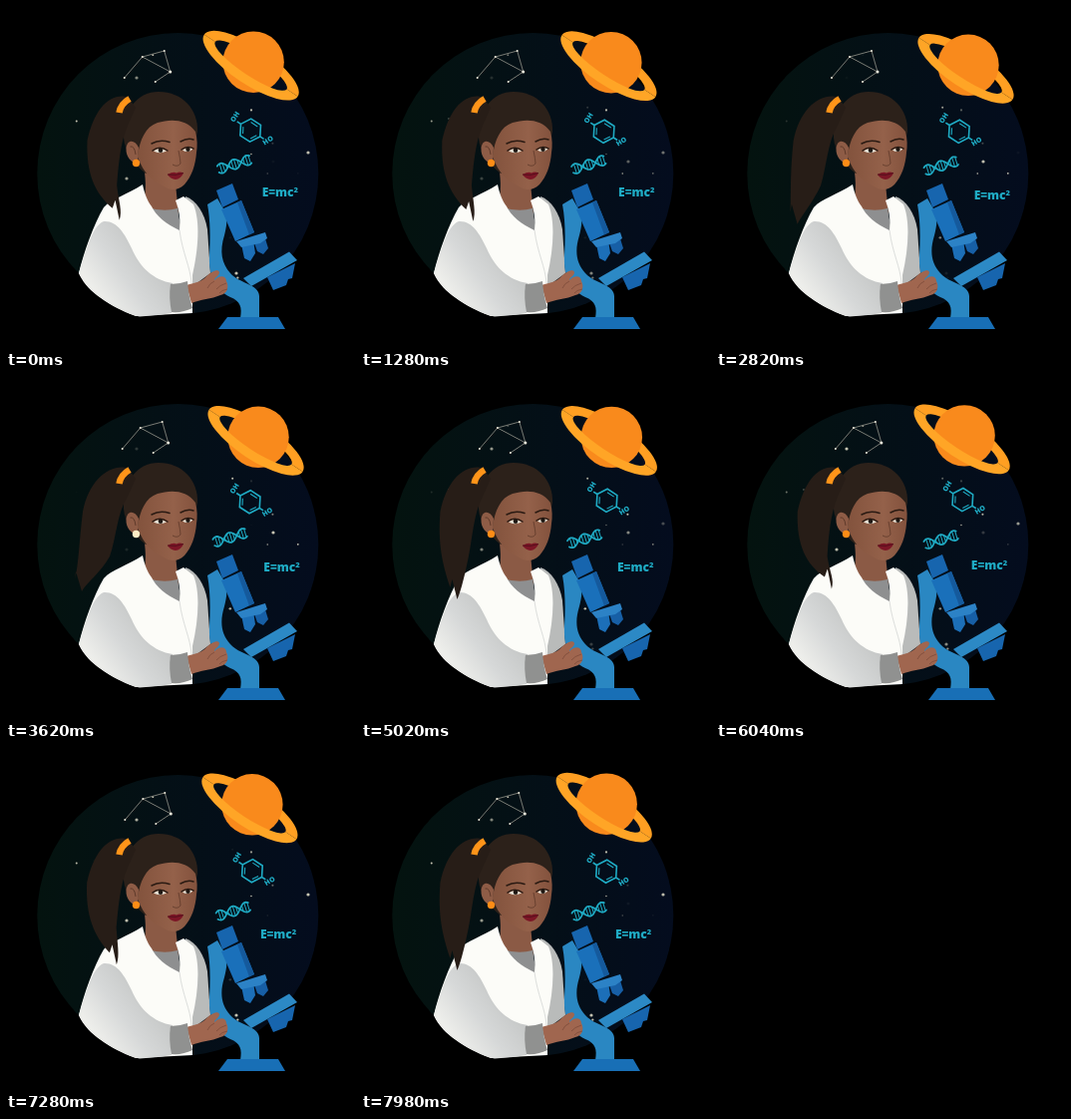
Animation of 350 by 344 pixels, one loop 8000 ms. Source, as an HTML page:

```html
<!DOCTYPE html>
<html lang="en">
<head>
<meta charset="utf-8">
<title>Scientist</title>
<style>
html, body { margin: 0; width: 100%; height: 100%; overflow: hidden; background: #000; }
svg { display: block; width: 100vw; height: 100vh; }
text { font-family: "Open Sans", "Noto Sans", sans-serif; font-weight: 800; }
</style>
</head>
<body>
<svg viewBox="0 0 350 344">
  <defs>
    <linearGradient id="night">
      <stop offset="0" stop-color="#04130f"/><stop offset="1" stop-color="#040c1e"/>
    </linearGradient>
    <linearGradient id="sleeveFill" x1=".9" y1=".3" x2=".1" y2=".9">
      <stop offset="0" stop-color="#bfc1c0"/><stop offset=".5" stop-color="#d6d8d8"/><stop offset="1" stop-color="#f8f8f3"/>
    </linearGradient>
    <linearGradient id="skin">
      <stop offset="0" stop-color="#83533d"/><stop offset=".6" stop-color="#94614a"/><stop offset="1" stop-color="#83523d"/>
    </linearGradient>
    <clipPath id="back"><rect x="-70" y="-40" width="140" height="40"/></clipPath>
    <clipPath id="front"><rect x="-70" y="0" width="140" height="40"/></clipPath>
  </defs>

  <rect width="350" height="344" fill="#000"/>
  <circle cx="172.300" cy="168" r="141" fill="url(#night)"/>
  <g id="stars" fill="#c8c6b4"></g>

  <g id="sky" fill="none" stroke="#96968c" stroke-width=".8">
    <path d="M0 0L18 -21L40 -27L46 -6L31 4M18 -21L46 -6"/>
    <g fill="#eeeadb" stroke="none">
      <circle r="1"/><circle cx="18" cy="-21" r="1"/><circle cx="40" cy="-27" r="1"/>
      <circle cx="46" cy="-6" r="1.500"/><circle cx="31" cy="4" r="1"/>
    </g>
  </g>

  <g id="planet">
    <g transform="translate(-2.500 3.500) rotate(33.500)"><path class="ring" clip-path="url(#back)" fill="#ff9f22"/></g>
    <circle r="30.700" fill="#f98a1c"/>
    <g transform="translate(-2.500 3.500) rotate(33.500)"><path class="ring" clip-path="url(#front)" fill="#ffa526"/></g>
  </g>

  <g id="molecule" fill="none" stroke="#1fabc4" stroke-width="1.600">
    <g transform="rotate(33)">
      <path d="M-11.500 0L-5.800 -10H5.800L11.500 0L5.800 10H-5.800ZM-11.500 0H-16M11.500 0H16"/>
      <path d="M-4 -7H4M8 1L4.500 7M-8 1L-4.500 7" stroke-width="1.100"/>
    </g>
    <g fill="#1fabc4" stroke="none" font-size="7" text-anchor="middle">
      <text transform="translate(-15.500 -13.500) rotate(-58)" y="2.500">OH</text>
      <text transform="translate(17.500 10) rotate(-32)" y="2.500">HO</text>
    </g>
  </g>

  <g id="dna" fill="none" stroke="#1fabc4" stroke-width="1.700" stroke-linecap="round">
    <g transform="rotate(-17)">
      <path id="strandA"/><path id="strandB"/><path id="rungs" stroke-width="1"/>
    </g>
  </g>

  <g id="formula" fill="#1fabc4">
    <text font-size="12">E=mc<tspan font-size="7.500" dy="-4">2</tspan></text>
  </g>

  <!-- far sleeve, neck, coat -->
  <path d="M180 191C191 195 199 207 202 224L205 268L186 282Z" fill="#b9bbba"/>
  <path d="M138 160C141 178 140 188 138 198L150 210L173 209L170 178Z" fill="#8b5a45"/>
  <path d="M142 202Q158 207 172 203L176 226L164 226Z" fill="#8e8f90"/>
  <path d="M137 179C122 189 106 193 98 202C88 219 78 247 73 268C80 284 96 297 130 311L187 308V270C193 244 195 216 188 199L178 191L170 195C174 206 175 214 174 225C161 219 150 210 146 201C141 194 139 188 137 179Z" fill="#fcfcf8"/>
  <path d="M174 225C177 248 185 262 186 278" fill="none" stroke="#dcdedc"/>
  <path d="M98 216C111 215 119 228 126 243C134 262 148 275 167 278L166 308Q150 311 134 311.500C118 308 88 294 73 268C79 250 86 220 98 216Z" fill="url(#sleeveFill)"/>

  <!-- head -->
  <path d="M118 132C117 104 132 86 153 86C177 86 193 104 192 126L187 150L140 168C128 158 119 146 118 132Z" fill="#2c211a"/>
  <path d="M132 151C134 134 140 121 152 117C165 113 181 113 190 126C192 133 192 141 191 147C190 160 186 171 179 179C172 186 164 185 157 180C147 176 138 168 132 151Z" fill="url(#skin)"/>
  <path d="M133 142C129 133 121 134 120.500 143C120 151 126 158 132 158Z" fill="#8e5c46"/>
  <path d="M130 149Q129 140 124.500 141" fill="none" stroke="#5e3a2a"/>
  <g fill="none" stroke="#2a1a12" stroke-linecap="round">
    <path d="M146 138Q154 133.500 164 136.500M175 136Q182 132 188 134" stroke-width="1.500"/>
    <path d="M147 145Q154 139.500 162 145M176 144Q182 139.500 188 143" stroke-width="1.500"/>
  </g>
  <path d="M148 145.500Q154 141 161 145.500Q154 149 148 145.500ZM177 144.500Q182 141 187.500 143.500Q182 148 177 144.500Z" fill="#e8e4d8"/>
  <g fill="#1f1712"><circle cx="155" cy="144.800" r="2.300"/><circle cx="182.500" cy="143.800" r="2.200"/></g>
  <path d="M173 145Q175 154 175 158Q172 162 167 159" fill="none" stroke="#68402f"/>
  <path d="M162 169Q168 165.500 171 167.500Q174 165.500 178 167.500Q175 174 170 174Q165 173.500 162 169Z" fill="#7c1626"/>
  <path d="M162 169Q170 170.500 178 167.500" fill="none" stroke="#4b0d18" stroke-width=".8"/>
  <circle id="earring" cx="130.500" cy="157.500" r="3.700"/>

  <path id="tail" fill="#271d17"/>
  <path d="M113.500 107Q115 98 124 93" fill="none" stroke="#ff9419" stroke-width="6.500"/>

  <!-- microscope -->
  <path d="M202 199L212 193L219 205C223 213 221 222 219 230C214 246 216 258 225 268C233 278 254 279 254 291V313H235C237 302 235 296 225 292C209 284 203 270 204 250C205 233 205 215 202 199Z" fill="#2a87c2"/>
  <path d="M211 185L227 178L233 194L217 202Z" fill="#1765ae"/>
  <path d="M216 204L236 195L249 227L230 236Z" fill="#1a70ba"/>
  <path d="M232 197L236 195L249 227L244 229.500Z" fill="#155a9d"/>
  <path d="M236 239L248 235L250 248L245 256L239 253Z" fill="#1c6fb8"/>
  <path d="M248 235L259 230L263 243L258 249L252 246Z" fill="#175fa6"/>
  <path d="M231 236L260 227L262 233L255 238L236 242Z" fill="#2c82c6"/>
  <path d="M262 272L290 258L287 273L283 274L281 280L268 285Z" fill="#1765ae"/>
  <path d="M238 273L284 246.500L292 255L246 281Z" fill="#2c89c5"/>
  <path d="M222 312H273L280 324H213Z" fill="#186fb6"/>

  <!-- hand -->
  <path d="M181 280C190 277 196 277 201 271C206 266 213 263 214 267C214 271 209 272 209 275C215 269 221 271 221 276C224 281 222 289 215 290C206 294 195 294 186 298Z" fill="#a0664f"/>
  <path d="M209 276Q204 278 202 283M221 278Q214 280 211 284M222 284Q216 285 214 288" fill="none" stroke="#7d4c3a" stroke-width=".8"/>
  <path d="M165 279Q174 279 182 276Q183 291 187 303Q177 308 166 307Q163 292 165 279Z" fill="#909190"/>
</svg>

<script>
const LOOP = 8000;
const $ = id => document.getElementById(id);
const ellipse = (rx, ry) => `M${-rx} 0A${rx} ${ry} 0 1 0 ${rx} 0A${rx} ${ry} 0 1 0 ${-rx} 0Z`;

// Slow swing around a middle value, highest at step `peak`
const swing = (n, mid, amp, period, peak) => mid + amp * Math.cos((n - peak) / period * 2 * Math.PI);

// Steps come in threes: a 100 ms hold, then two of 20 ms
function stepAt(t) {
  const shifted = t + 120, rest = shifted % 140;
  return Math.floor(shifted / 140) * 3 + (rest < 100 ? 0 : rest < 120 ? 1 : 2);
}

let seed = 11;
const random = () => (seed = seed * 16807 % 2147483647) / 2147483647;

// The brightest stars are placed, the faint ones scattered over the disc
const stars = [[268, 156, 75], [303, 147, 160], [121, 173, 145], [231, 268, 165], [131, 72, 138]]
  .map(([x, y, peak]) => ({ x, y, peak, r: 1.6 }));
for (let i = 0; i < 16; i++) {
  const angle = random() * 2 * Math.PI, dist = 135 * Math.sqrt(random());
  stars.push({
    x: 172 + dist * Math.cos(angle), y: 168 + dist * Math.sin(angle),
    peak: random() * 170, r: .8 + random() * .5
  });
}

function build() {
  for (const ring of document.querySelectorAll(".ring")) {
    ring.setAttribute("d", ellipse(56.3, 19) + ellipse(43, 10));
    ring.setAttribute("fill-rule", "evenodd");
  }
  const wave = x => 5 * Math.sin((x + 17) / 34 * Math.PI * 2.5 + .7);
  const strand = sign => {
    let d = "";
    for (let x = -17; x <= 17; x++) d += `${d ? "L" : "M"}${x} ${(sign * wave(x)).toFixed(2)}`;
    return d;
  };
  let rungs = "";
  for (let x = -14; x < 17; x += 3) rungs += `M${x} ${wave(x)}V${-wave(x)}`;
  $("strandA").setAttribute("d", strand(1));
  $("strandB").setAttribute("d", strand(-1));
  $("rungs").setAttribute("d", rungs);
  $("stars").innerHTML = stars.map(s => `<circle cx="${s.x}" cy="${s.y}" r="${s.r}"/>`).join("");
}

function place(id, x, y) {
  $(id).setAttribute("transform", `translate(${x} ${y})`);
}

// s runs from -1 (blown out to the left) to 1 (hanging by the neck)
function drawHair(s) {
  const x = 97 + 21 * s, y = 223 - (s > 0 ? 13 : 8) * s * s;
  $("tail").setAttribute("d",
    `M122 91C103 87 ${86 + 3 * s} 104 ${79.5 + 2.5 * s} 135`
    + `C${77 + 4 * s} 168 ${82 + 9 * s} 188 ${x - 7} ${y - 12}`
    + `L${x - 5 + s} ${y - 20}L${x} ${y}`
    + `C${x + 4 - s} ${y - 9} ${105 + 10 * s} 196 ${108 + 4 * s} 180`
    + `C${112 + s} 160 ${113 + 2 * s} 137 122 120L130 102Z`);
}

function draw(t) {
  const n = stepAt(t);
  place("planet", swing(n, 249.6, 3.5, 220, 72), swing(n, 58.4, 2.3, 170, 95));
  place("formula", swing(n, 256.8, 1.9, 220, 58), swing(n, 193, 2.2, 170, 95));
  place("molecule", swing(n, 245.4, 2, 185, 137), swing(n, 124.5, 1.5, 190, 47));
  place("dna", swing(n, 226.5, 2.5, 180, 8), swing(n, 161.3, 2.5, 340, 170));
  place("sky", swing(n, 117.9, 2, 165, 137), 72);

  const s = swing(n, 0, 1, 126, 141);
  drawHair(s);
  const glint = Math.max(0, -s) ** 24;
  $("earring").setAttribute("fill", `rgb(255,${140 + 98 * glint},${22 + 180 * glint})`);

  stars.forEach((star, i) => {
    $("stars").children[i].setAttribute("opacity", swing(n, .5, .5, 170, star.peak).toFixed(3));
  });
}

build();
const start = performance.now();
(function tick() {
  draw((performance.now() - start) % LOOP);
  requestAnimationFrame(tick);
})();
</script>
</body>
</html>
```
